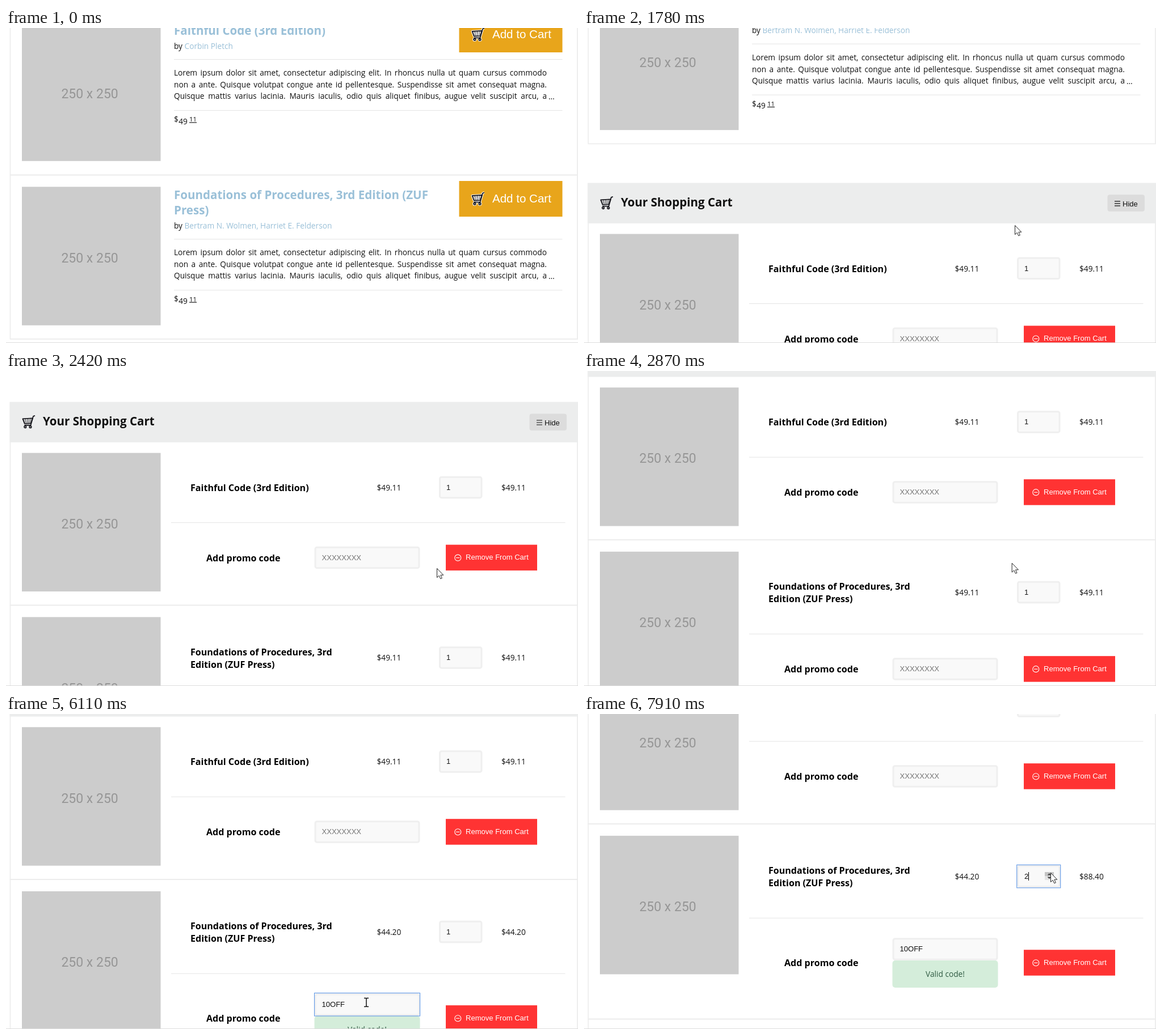
Recreate the animation shown at these times as an HTML page. Size 1008 by 556 pixels, loop 7.99 s.

```html
<!DOCTYPE html>
<html lang="en">
<head>
<meta charset="utf-8">
<title>Shopping cart</title>
<style>
html, body { margin: 0; width: 100%; height: 100%; overflow: hidden; background: #fff; }
svg { display: block; width: 1008px; height: 556px; }
text, .lorem { font: 13.7px "Open Sans", sans-serif; fill: #111; color: #111; white-space: pre; }
.title { font-size: 20.56px; font-weight: 700; }
.link { fill: #9ac0d8; }
.name { font-size: 16.07px; font-weight: 700; fill: #000; }
.ui { font: 13.04px "Liberation Sans", Arial, sans-serif; }
.big { font-size: 20.54px; }
.white { fill: #fff; }
.hint { fill: #757575; }
.cents { font-size: 11.4px; text-decoration: underline; }
.size { font: 23px Roboto, sans-serif; fill: #969696; text-anchor: middle; }
.mid { text-anchor: middle; }
.lorem { line-height: 20.54px; }
.lorem div { text-align: justify; text-align-last: justify; white-space: normal; }
.field { fill: #f9f9f9; stroke: #efefef; stroke-width: 3; }
.ring { fill: none; stroke: #5f97e6; stroke-width: 1.1; }
</style>
</head>
<body>
<svg id="stage" viewBox="0 0 1008 556"></svg>
<script>
const LOOP = 7990;
const text = (x, y, s, cls = '', id = '') => `<text x="${x}" y="${y}" class="${cls}" id="${id}">${s}</text>`;
const rect = (x, y, w, h, fill, more = '') => `<rect x="${x}" y="${y}" width="${w}" height="${h}" fill="${fill}" ${more}/>`;
const group = (x, y, body, id = '') => `<g id="${id}" transform="translate(${x} ${y})">${body}</g>`;
const rule = (x1, x2, y) => rect(x1, y - .5, x2 - x1, 1, '#e4e4e4');
const frame = (y, h) => rect(7.5, y, 999.5, h, 'none', 'stroke="#ededed" stroke-width="1.8"');
const field = (x, y, w) => rect(x + 1.5, y + 1.5, w - 3, 36.5, '', 'rx="3" class="field"');
const ring = (x, y, w, h, id) => rect(x, y, w, h, '', `class="ring" id="${id}"`);
const picture = y => rect(28, y, 244.5, 244.5, '#ccc') + text(147.6, y + 133.3, '250 x 250', 'size');

function cartIcon(halo) {
  const body = `<path d="M1.5 7L19 6L15.8 14.8L4.8 15.5Z"/><path d="M23 1.5L20 2.5L15.5 18.3H4.5" fill="none"/>
    <circle cx="5.8" cy="21.2" r="1.7"/><circle cx="15" cy="21.2" r="1.7"/>`;
  const mesh = '<path d="M3.5 9.7L18 9M4.3 12.5L17 11.8M6 7.5L7.5 15M10.5 7L10.8 15M15 6.5L13.8 14.5" stroke-width=".8" stroke-dasharray="1.6 .9"/>';
  return `<g fill="${halo ? '#fff' : 'none'}" stroke-linejoin="round">
    ${halo ? `<g stroke="#fff" stroke-width="3.8">${body}</g>` : ''}
    <g stroke="#16161c" stroke-width="1.8">${body}${mesh}</g></g>`;
}

const lorem = [
  'Lorem ipsum dolor sit amet, consectetur adipiscing elit. In rhoncus nulla ut quam cursus commodo',
  'non a ante. Quisque volutpat congue ante id pellentesque. Suspendisse sit amet consequat magna.',
  'Quisque mattis varius lacinia. Mauris iaculis, odio quis aliquet finibus, augue velit suscipit arcu, a'
].map(line => `<div>${line}</div>`).join('');

// One book of the shop list; a second title line pushes the rest down.
function book(y, lines, authors, buttonId) {
  const details = rule(296, 980.5, 55.5)
    + text(296, 36.8, 'by') + text(314.5, 36.8, authors, 'link')
    + `<foreignObject x="296" y="69.4" width="657" height="64"><div class="lorem">${lorem}</div></foreignObject>`
    + text(956, 126, '…') + rule(296, 980.5, 145.5)
    + text(296, 166, '$') + text(304.2, 169.5, '49') + text(323, 165.3, '11', 'cents');
  const button = rect(798.5, -20, 182, 63, '#e8a51b') + group(820, -1, cartIcon(true))
    + text(857, 18.3, 'Add to Cart', 'ui big white');
  return group(0, y, picture(-9.7)
    + lines.map((s, i) => text(296, 11.5 + i * 27.8, s, 'title link')).join('')
    + group(0, (lines.length - 1) * 27.3, details) + group(0, 0, button, buttonId));
}

// One cart row: upper half, and the promo half whose parts can move.
function cartItem(y, lines, topShift, promoShift, n) {
  const firstLine = lines.length > 1 ? 56.5 : 67;
  const top = lines.map((s, i) => text(325, firstLine + i * 22, s, 'name')).join('')
    + text(653.5, 66.3, '$49.11', '', 'price' + n) + field(763, 41, 76.5)
    + text(776, 65.3, '1', 'ui', 'qty' + n) + text(873, 66.3, '$49.11', '', 'total' + n);
  const remove = rect(775, 162, 161, 45.5, '#f33')
    + '<g fill="none" stroke="#fff" stroke-width="1.1"><circle cx="796.3" cy="185" r="5.5"/><path d="M793 185H799.6"/></g>'
    + text(810, 188.8, 'Remove From Cart', 'ui white');
  const promo = rule(291, 985.5, 123)
    + group(0, 0, text(353, 191, 'Add promo code', 'name') + remove, 'side' + n)
    + group(0, 0, field(543.5, 165, 186) + text(556.5, 189, 'XXXXXXXX', 'ui hint', 'code' + n), 'promo' + n);
  return picture(y) + group(0, 708.2 + topShift, top) + group(0, 708.2 + promoShift, promo);
}

const arrow = '<path id="arrow" d="M.5 .5V16.5L4.2 13.2L6.8 18.8L9.3 17.7L6.9 12.2H11.8Z" fill="#fff" stroke="#222" stroke-width="1"/>';
const beam = '<path id="beam" d="M-4 -7.5H-1L0 -6.5L1 -7.5H4M-4 7.5H-1L0 6.5L1 7.5H4M0 -6.5V6.5" fill="none" stroke="#111" stroke-width="1.5"/>';
const hand = `<path id="hand" d="M-1.5 1Q0 -1 1.5 1V7L8 8.2Q10.5 9 10.5 11.5V14L8.5 19H-.5L-5.5 12.5Q-6.5 10 -4 10.5L-1.5 12.5Z"
  fill="#fff" stroke="#222" stroke-width="1"/>`;

document.getElementById('stage').innerHTML = group(0, 0,
  frame(-300, 559.5) + frame(259.5, 289.5)
  + book(0, ['Faithful Code (3rd Edition)'], 'Corbin Pletch', 'add1')
  + book(290, ['Foundations of Procedures, 3rd Edition (ZUF', 'Press)'], 'Bertram N. Wolmen, Harriet E. Felderson', 'add2')
  + ring(798.7, 270.2, 181.8, 62.8, 'addRing')
  + frame(619, 358) + frame(977, 344.5) + frame(1321.5, 300)
  + rect(6.5, 618.5, 1001.5, 71, '#eceded') + group(28, 641, cartIcon(false))
  + text(65, 660, 'Your Shopping Cart', 'title')
  + rect(922.5, 639, 65.5, 29.5, '#dcdcdc', 'rx="4"')
  + '<path d="M935 650.5H945M935 654.5H945M935 658.5H945" stroke="#111" stroke-width="1.1"/>'
  + text(949, 659.2, 'Hide', 'ui')
  + cartItem(708.2, ['Faithful Code (3rd Edition)'], 0, 0, 1)
  + cartItem(997.9, ['Foundations of Procedures, 3rd', 'Edition (ZUF Press)'], 300.5, 312, 2)
  + group(0, 0, rect(543.5, 1218, 186, 48, '#d4edda', 'rx="5" id="noteBox"') + text(636.5, 1246.8, '', 'mid', 'noteText'), 'note')
  + ring(543.5, 1184.5, 186, 40.5, 'codeRing') + ring(762.7, 1049.3, 77, 40.5, 'qtyRing')
  + group(812, 1062, rect(0, 0, 16, 14, '#e4e4e4') + rect(0, 0, 16, 7, '#c4c4c4')
    + '<path d="M4.5 5.5L8 2L11.5 5.5ZM4.5 8.5L8 12L11.5 8.5Z" fill="#444"/>', 'spinner')
  + rect(0, 0, 1, 15, '#000', 'id="caret"'), 'page')
  + rect(0, 555, 1008, 1, '#dcdcdc') + group(0, 0, arrow + beam + hand, 'cursor');

const $ = id => document.getElementById(id);
const show = (id, on) => $(id).setAttribute('visibility', on ? 'visible' : 'hidden');
const move = (id, x, y) => $(id).setAttribute('transform', `translate(${x} ${y})`);
const write = (id, s) => { if ($(id).textContent !== s) $(id).textContent = s; };
const clamp = u => Math.min(1, Math.max(0, u));
const glide = (t, from, to, power) => Math.sin(Math.PI / 2 * clamp((t - from) / (to - from)) ** power) ** 2;
const scrollAt = t => 489 * glide(t, 1460, 2090, .675) + 196 * glide(t, 2240, 3010, .594) + 98 * glide(t, 6115, 6600, .8);

const route = [
  [0, 938, 560], [850, 827, 290], [1000, 827, 290], [1400, 759, 348], [2650, 759, 348], [3010, 751, 334],
  [3100, 751, 334], [3700, 635, 509], [6420, 635, 509], [6880, 660, 402], [6920, 660, 402], [7380, 888, 242], [7680, 822, 280]
];
function pointer(t) {
  const i = route.findIndex(p => p[0] > t);
  if (i < 0) return route.at(-1).slice(1);
  const a = route[i - 1], b = route[i], u = (t - a[0]) / (b[0] - a[0]), e = u * u * (3 - 2 * u);
  return [a[1] + (b[1] - a[1]) * e, a[2] + (b[2] - a[2]) * e];
}

const keys = [4480, 4630, 5260, 5430, 5570];
const CLICK_ADD = 930, CLICK_CODE = 3780, CHECKED = keys[1], VALID = keys[4], CLICK_QTY = 7830;

function draw(t) {
  const scroll = scrollAt(t), [x, y] = pointer(t);
  move('page', 0, -scroll);

  const addFocus = t >= CLICK_ADD && t < CLICK_CODE;
  $('add2').setAttribute('opacity', addFocus ? .8 : 1);
  show('addRing', addFocus);

  const checked = t >= CHECKED, valid = t >= VALID, twice = t >= CLICK_QTY;
  const lift = checked ? -7 : 0;
  move('side2', 0, checked ? 17 : 0);
  move('promo2', 0, lift);
  move('codeRing', 0, lift);
  show('note', checked);
  $('noteBox').setAttribute('fill', valid ? '#d4edda' : '#f8d7da');
  $('noteText').style.fill = valid ? '#2f5a42' : '#721c24';
  write('noteText', valid ? 'Valid code!' : 'Invalid code!');

  const typed = '10OFF'.slice(0, keys.filter(k => k <= t).length);
  write('code2', typed || 'XXXXXXXX');
  $('code2').classList.toggle('hint', !typed);
  write('price2', valid ? '$44.20' : '$49.11');
  write('total2', twice ? '$88.40' : valid ? '$44.20' : '$49.11');
  write('qty2', twice ? '2' : '1');

  const codeFocus = t >= CLICK_CODE && !twice;
  show('codeRing', codeFocus);
  show('qtyRing', twice);
  const lastInput = [CLICK_CODE, ...keys, CLICK_QTY].filter(k => k <= t).pop();
  show('caret', lastInput && (t - lastInput) % 1080 < 540);
  if (twice) move('caret', 783, 1062);
  else move('caret', 556.5 + (typed ? $('code2').getComputedTextLength() : 0), 1197 + lift);

  const docY = y + scroll;
  const overQty = x > 763 && x < 840 && docY > 1049 && docY < 1090;
  const overCode = x > 543 && x < 730 && docY > 1184 + lift && docY < 1225 + lift;
  const overAdd = x > 798 && x < 981 && docY > 270 && docY < 333;
  show('spinner', overQty || twice);
  show('hand', overAdd);
  show('beam', overCode);
  show('arrow', !overAdd && !overCode);
  move('cursor', x, y);
}

function tick() {
  draw(performance.now() % LOOP);
  requestAnimationFrame(tick);
}
tick();
</script>
</body>
</html>
```
